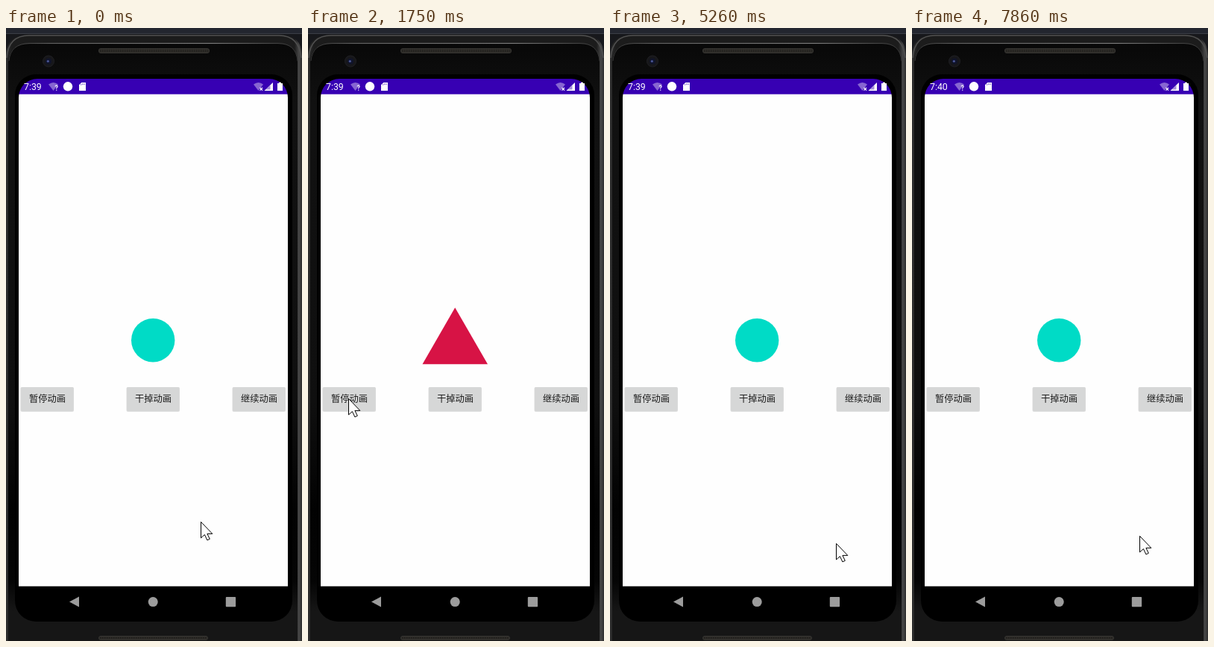
Recreate the animation shown at these times as an HTML page. Size 397 by 821 pixels, loop 8000 ms.

```html
<!DOCTYPE html>
<html lang="zh">
<head>
<meta charset="utf-8">
<title>Shape animation</title>
<style>
html, body { margin: 0; width: 100%; height: 100%; overflow: hidden; background: #23262f; }
svg { display: block; width: 397px; height: 821px; }
.label { font: 12.25px "Noto Sans CJK SC", "Noto Sans CJK", sans-serif; fill: #1d1d1d; text-anchor: middle; }
#clock { font: 12.3px Roboto, sans-serif; fill: #fff; }
</style>
</head>
<body>
<svg viewBox="0 0 397 821">
  <defs>
    <linearGradient id="rim">
      <stop offset="0" stop-color="#303030"/><stop offset=".02" stop-color="#1c1c1c"/>
      <stop offset=".975" stop-color="#1c1c1c"/><stop offset=".99" stop-color="#484848"/><stop offset="1" stop-color="#2c2c2c"/>
    </linearGradient>
    <linearGradient id="glass" x2="0" y2="1">
      <stop offset="0" stop-color="#080808"/><stop offset=".1" stop-color="#111"/><stop offset=".6" stop-color="#0f0f0f"/>
      <stop offset=".78" stop-color="#020202"/><stop offset=".9" stop-color="#050505"/><stop offset=".95" stop-color="#161616"/>
    </linearGradient>
    <linearGradient id="shine">
      <stop offset="0" stop-color="#333"/><stop offset=".15" stop-color="#6c6c6c"/>
      <stop offset=".7" stop-color="#8a8a8a"/><stop offset="1" stop-color="#333"/>
    </linearGradient>
    <pattern id="mesh" width="3" height="3" patternUnits="userSpaceOnUse">
      <path d="M0 0H3V3H0Z" fill="#2e2c28"/><path d="M0 0H1.5V1.5H0Z" fill="#1c1b19"/>
    </pattern>
    <clipPath id="screen"><rect x="17" y="68" width="361" height="722" rx="25"/></clipPath>
    <filter id="blur" x="-20%" y="-40%" width="140%" height="180%"><feGaussianBlur stdDeviation="1.7"/></filter>
  </defs>

  <rect width="397" height="821" fill="#23262f"/>
  <rect y="7" width="397" height="1" fill="#3b3e46"/>
  <rect y="8" width="397" height="813" fill="#17181c"/>
  <path d="M0 821V36Q1 9 30 9H367Q396 9 397 36V821Z" fill="url(#rim)"/>
  <path d="M1 40Q3 10 31 10H366Q393 10 396 40" fill="none" stroke="#505050" stroke-width="1.5"/>
  <path d="M3 821V46Q4 21 32 21H365Q390 21 391 46V821Z" fill="url(#glass)"/>
  <path d="M4 44Q6 20.6 32 20.6H365Q389 20.6 391 44" fill="none" stroke="url(#shine)"/>
  <rect x="12" y="62" width="372" height="733" rx="28" fill="#000"/>
  <g stroke="#353431" fill="url(#mesh)">
    <rect x="124.5" y="27.5" width="148" height="6" rx="2.5"/>
    <rect x="124.5" y="814.5" width="146" height="5" rx="2.5"/>
  </g>
  <circle cx="57" cy="44.5" r="7.5" fill="#17171a" stroke="#202024"/>
  <circle cx="57" cy="44.5" r="4" fill="#10142a"/>
  <circle cx="56.3" cy="44.5" r="1.6" fill="#4a5696"/>

  <g clip-path="url(#screen)">
    <rect x="17" y="68" width="361" height="21" fill="#3700b3"/>
    <rect x="17" y="88.7" width="361" height="659" fill="#fefefe"/>
  </g>

  <text id="clock" x="24" y="83"></text>
  <g fill="#fff">
    <path d="M57 75.5Q63.5 70.5 70 75.5L63.5 84Z" opacity=".4"/>
    <path d="M66 78.4Q66.3 77 67.7 77Q69.2 77.2 69 78.6Q68.7 79.4 67.7 80.4V81.2M67.7 82.4V83.8" fill="none" stroke="#fff" stroke-width="1.2"/>
    <circle cx="83" cy="78.3" r="6.2"/>
    <path d="M101.3 73H107V84H98V76.2Z"/>
    <path d="M100.6 76.6V75.2M102.8 76V74.4M105 76V74.4" stroke="#3700b3" stroke-width=".8"/>
    <path d="M332 75.5Q338.5 70.5 345 75.5L338.5 84Z" opacity=".4"/>
    <path d="M340.5 80L344 83.6M344 80L340.5 83.6" stroke="#fff" stroke-width="1.2"/>
    <path d="M358 73V84H346.5Z"/>
    <path d="M354.5 76.4V82.4H348.2Z" fill="#3700b3" opacity=".45"/>
    <path d="M364 74H366V72.8H369V74H371V84H364Z"/>
  </g>
  <g fill="#9c9c9c">
    <path d="M85 768.6L98 761.6V775.6Z"/><circle cx="197.2" cy="768.6" r="6.5"/>
    <rect x="294.8" y="762" width="13.3" height="13.3" rx="1"/>
  </g>

  <circle id="circle" cx="197.2" cy="418.2" r="29.2" fill="#00dbc6"/>
  <rect id="square" x="153" y="374" width="88" height="88" fill="#007f66"/>
  <path id="triangle" d="M197.2 374.5L241 450.3H153.5Z" fill="#d71345"/>
  <g id="buttons"></g>
  <path id="cursor" d="M.5 .5V22L5.4 17.6L8.9 25L12.3 23.4L8.9 16.4H15.8Z" fill="#fff" stroke="#000" stroke-linejoin="round"/>
</svg>
<script>
const LOOP = 8000;
const $ = id => document.getElementById(id);

// Shape shown from each time on
const shapes = [[0, 'circle'], [720, 'square'], [1600, 'triangle'], [4980, 'circle'],
  [5920, 'square'], [7020, 'triangle'], [7860, 'circle']];

// Pointer moves: start, step length, step count, then the points passed
const moves = [
  [120, 150, 7, [261, 661], [54, 496]],
  [2140, 120, 3, [54, 496], [254, 614]],
  [3030, 1, 1, [254, 614], [255, 614]],
  [3170, 147, 7, [255, 614], [300, 528], [328, 484], [341, 490]],
  [4210, 1, 1, [341, 490], [343, 495]],
  [4730, 127, 4, [343, 495], [301, 690]],
  [5260, 1, 1, [301, 690], [303, 690]],
  [5920, 130, 2, [303, 690], [305, 684]],
  [6180, 1, 1, [305, 684], [305, 682]],
  [7170, 1, 1, [305, 682], [305, 680]]
];

const buttons = [
  { x: 19.5, text: '暂停动画', down: 1040, up: 1750, touch: 54 },
  { x: 161.5, text: '干掉动画' },
  { x: 303.5, text: '继续动画', down: 4200, up: 4660, touch: 341 }
];

$('buttons').innerHTML = buttons.map(({ x, text, touch = 0 }, i) => `
  <clipPath id="clip${i}"><rect x="${x + .5}" y="481" width="70.5" height="31.5" rx="1.5"/></clipPath>
  <rect x="${x}" y="481" width="71.5" height="33" rx="2" fill="#000" opacity=".13"/>
  <rect id="shadow${i}" x="${x}" y="483" width="71" height="32" rx="2" fill="#000" opacity=".32" filter="url(#blur)"/>
  <rect x="${x + .5}" y="481" width="70.5" height="32" rx="1.5" fill="#d6d7d7"/>
  <circle id="ripple${i}" cx="${touch}" cy="497" fill="#b9baba" clip-path="url(#clip${i})"/>
  <text class="label" x="${x + 36}" y="501">${text}</text>`).join('');

const ease = p => p * p * (3 - 2 * p);

function pointerAt(t) {
  const move = moves.filter(m => m[0] <= t).pop();
  if (!move) return moves[0][3];
  const [start, step, count, ...points] = move;
  const done = Math.min(count, Math.floor((t - start) / step) + 1) / count;
  const along = ease(done) * (points.length - 1);
  const i = Math.min(points.length - 2, Math.floor(along));
  return points[i].map((v, k) => Math.round(v + (points[i + 1][k] - v) * (along - i)));
}

function draw(t) {
  const shape = shapes.filter(s => s[0] <= t).pop()[1];
  for (const id of ['circle', 'square', 'triangle']) $(id).style.display = id === shape ? '' : 'none';
  buttons.forEach(({ down, up }, i) => {
    const pressed = t >= down && t < up;
    $('shadow' + i).style.display = pressed ? '' : 'none';
    $('ripple' + i).setAttribute('r', pressed ? Math.min(60, (t - down) * .24) : 0);
  });
  $('clock').textContent = t < 6740 ? '7:39' : '7:40';
  $('cursor').setAttribute('transform', `translate(${pointerAt(t)})`);
}

function frame() {
  draw(performance.now() % LOOP);
  requestAnimationFrame(frame);
}
frame();
</script>
</body>
</html>
```
